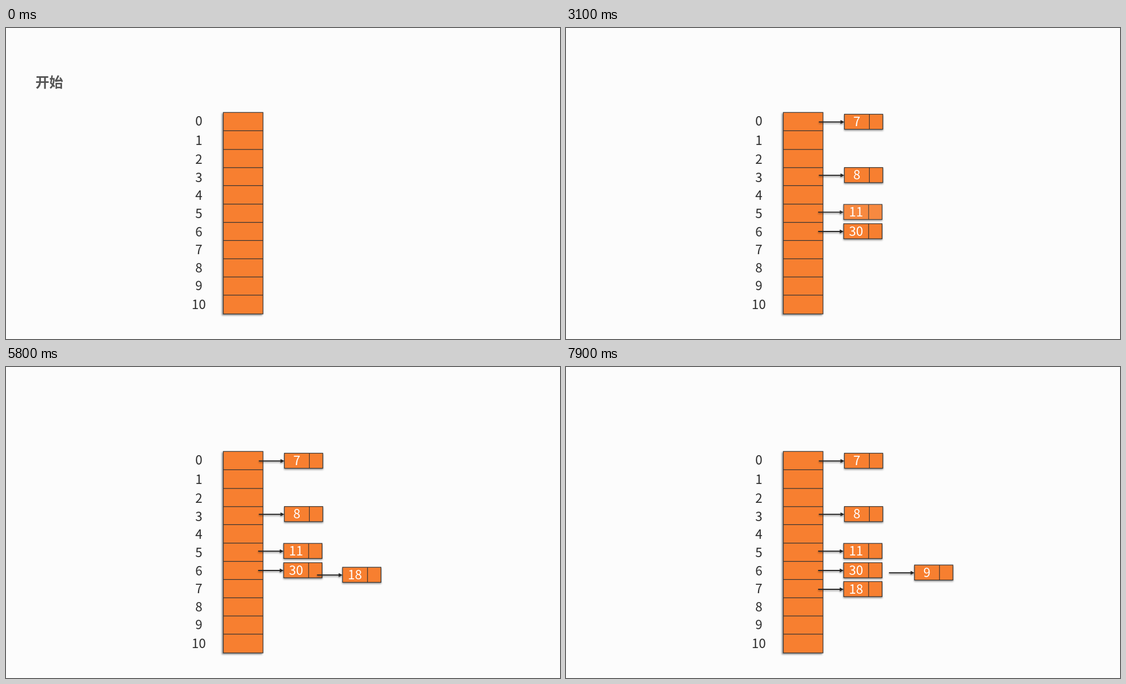
These frames come from a looping animation (998x561 px, 8000 ms). An HTML page:

```html
<!DOCTYPE html>
<html lang="zh">
<head>
<meta charset="utf-8">
<style>
  html, body { margin: 0; height: 100%; overflow: hidden; background: #fcfcfc; }
  svg { display: block; width: 998px; height: 561px; }
  text { font: 23px "Noto Sans CJK SC", "Noto Sans CJK", sans-serif; text-anchor: middle; fill: #2b2b2b; }
  #title { font-size: 25px; font-weight: 700; fill: #555; text-anchor: start; }
  .box { fill: #f77f30; stroke: #333; stroke-width: 1.2; }
  .rule { stroke: #333; stroke-width: 1.2; }
  .shaft { stroke: #262626; stroke-width: 2; }
  .head { fill: #262626; }
  .node text { fill: #fff; font-weight: 500; }
  .node { filter: drop-shadow(0 2.5px 1.5px rgba(0, 0, 0, .42)); }
  #table { filter: drop-shadow(-2px 2px 1.5px rgba(0, 0, 0, .45)); }
</style>
</head>
<body>
<svg viewBox="0 0 998 561">
  <text id="title" x="53" y="106.5">开始</text>
  <g id="table"></g>
  <g id="labels"></g>
  <g id="nodes"></g>
</svg>
<script>
const LOOP = 8000, STEP = 100, FADE = 500, MOVE = 820;
const $ = id => document.getElementById(id);

// Rows of the table and their index labels
const edges = [152.3, 185.3, 219.2, 251.8, 284.4, 317.6, 350.7, 383.3, 416.4, 449.2, 481.8, 515.8];
const labelY = [168, 203, 237, 270, 302, 335, 368, 400, 433, 465, 499];
$('table').innerHTML =
  `<rect class="box" x="391.5" y="${edges[0]}" width="71.5" height="${edges[11] - edges[0]}"/>` +
  edges.slice(1, -1).map(y => `<path class="rule" d="M391.5 ${y}H463"/>`).join('');
$('labels').innerHTML = labelY.map((y, i) => `<text x="347.3" y="${y + 8.4}">${i}</text>`).join('');

// start: fade-in time; moves: [start time, x, y] of each new place
const nodes = [
  { value: 7, x: 501.5, y: 155.5, start: 640, moves: [] },
  { value: 8, x: 501.5, y: 251.7, start: 1307, moves: [] },
  { value: 30, x: 500.2, y: 353, start: 1975, moves: [] },
  { value: 11, x: 500.2, y: 318.2, start: 2642, moves: [] },
  { value: 18, x: 639.4, y: 318.2, start: 3309, moves: [[4250, 639.4, 353.2], [5540, 500.2, 387]] },
  { value: 9, x: 627.8, y: 353.2, start: 6960, moves: [[7725, 627.8, 387]] }
];
$('nodes').innerHTML = nodes.map(n => `<g class="node">
  <path class="shaft" d="M-46 14H-5"/>
  <path class="head" d="M-7 10.6L0 14L-7 17.4Z"/>
  <rect class="box" width="69.2" height="27.2"/>
  <path class="rule" d="M45 0V27.2"/>
  <text x="22.3" y="21.7">${n.value}</text></g>`).join('');
const groups = [...$('nodes').children];

const progress = (t, start, length) => Math.min(1, Math.max(0, (t - start) / length));
const ease = p => p * p * (3 - 2 * p);

function draw(t) {
  $('title').setAttribute('opacity', 1 - progress(t, 640, 440));
  nodes.forEach((n, i) => {
    let { x, y } = n;
    for (const [start, toX, toY] of n.moves) {
      const p = ease(progress(t, start, MOVE));
      x += (toX - x) * p;
      y += (toY - y) * p;
    }
    groups[i].setAttribute('transform', `translate(${x} ${y})`);
    groups[i].setAttribute('opacity', progress(t, n.start, FADE));
  });
}

function tick() {
  const t = performance.now() % LOOP;
  draw(Math.floor(t / STEP) * STEP);
  requestAnimationFrame(tick);
}
tick();
</script>
</body>
</html>
```
